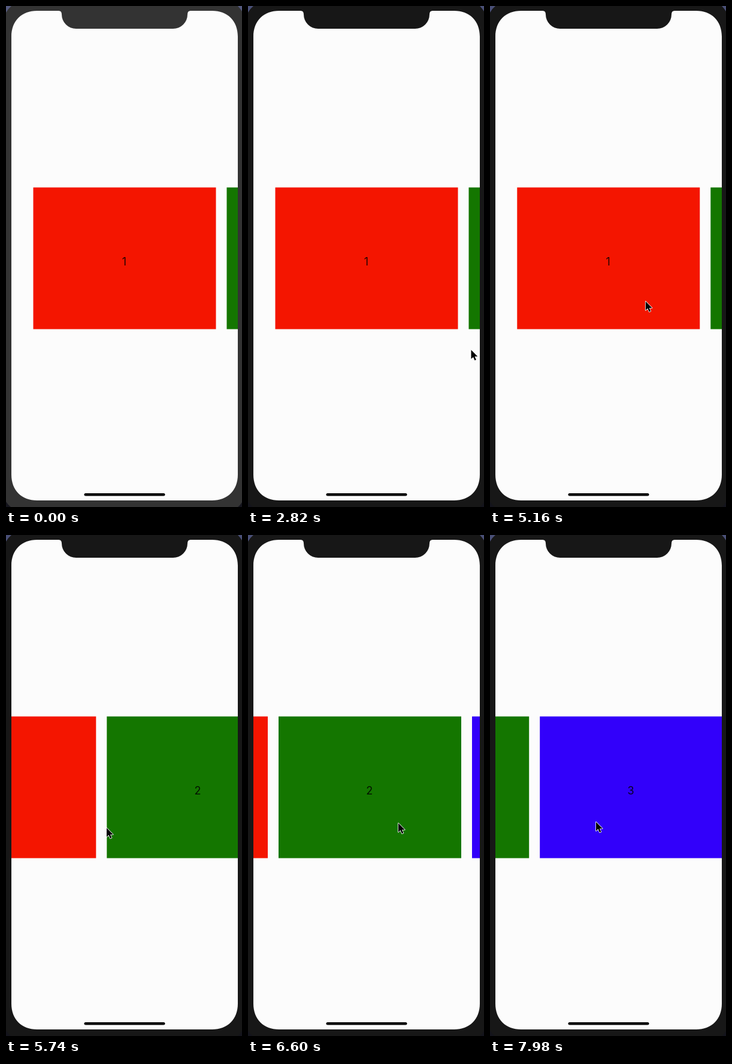
An HTML page that plays this animation: 394x838 px, repeating every 8 s.

```html
<!DOCTYPE html>
<html lang="en">
<head>
<meta charset="utf-8">
<title>Card carousel</title>
<style>
  html, body { margin: 0; width: 100%; height: 100%; overflow: hidden; background: #333; }
  svg { display: block; width: 100vw; height: 100vh; }
  text { font: 18px Inter, Roboto, sans-serif; text-anchor: middle; fill: #000; fill-opacity: .85; }
</style>
</head>
<body>
<svg viewBox="0 0 394 838">
  <defs>
    <path id="screen" d="M9 51C9 25 26 8 52 8H88Q93 8 93 14A24 24 0 0 0 117 38H279
      A24 24 0 0 0 303 14Q303 8 308 8H344C370 8 387 25 387 51V784
      C387 810 370 827 344 827H52C26 827 9 810 9 784Z"/>
    <clipPath id="clip"><use href="#screen"/></clipPath>
  </defs>
  <rect id="bezel" width="394" height="838"/>
  <path id="corners" d="M0 0H9Q4 4 0 11ZM394 0H387Q391 4 394 9Z"/>
  <path d="M0 838V829Q3 834 8 838ZM394 838V830Q391 835 387 838Z" fill="#14141c"/>
  <use href="#screen" fill="#fcfcfc"/>
  <g clip-path="url(#clip)">
    <g id="cards"></g>
  </g>
  <rect x="130.5" y="815" width="135" height="4.6" rx="2.3"/>
  <path id="cursor" d="M0 0V15L3.5 11.8L6 17.5L8.4 16.5L6 11H10.8Z"
    stroke="#fff" stroke-width="1.6" stroke-linejoin="round" paint-order="stroke"/>
</svg>
<script>
  const LOOP = 8000, PITCH = 323, DECAY = 277, ACTIVE_AT = 2800;
  const get = id => document.getElementById(id);
  const [bezel, corners, cards, cursor] = ['bezel', 'corners', 'cards', 'cursor'].map(get);

  cards.innerHTML = ['#f41500', '#147600', '#3200fa'].map((color, i) => `
    <g transform="translate(${45.5 + i * PITCH} 303.5)">
      <rect width="305" height="237" fill="${color}"/>
      <text x="151.8" y="130">${i + 1}</text>
    </g>`).join('');

  // Pointer stops: time, x, y
  const stops = [
    [2600, 394, 585], [3240, 316, 550], [3620, 310, 549], [4080, 268, 553],
    [4250, 263, 553], [4920, 258, 495], [5150, 260, 494], [5540, 168, 490],
    [5800, 168, 490], [6600, 251, 482], [6850, 268, 481], [7420, 177, 480], [LOOP, 177, 480]
  ];
  const ease = p => p * p * (3 - 2 * p);

  function pointer(t) {
    const i = stops.findIndex(stop => stop[0] > t);
    if (i < 1) return [394, 585];
    const [t0, x0, y0] = stops[i - 1], [t1, x1, y1] = stops[i];
    const p = ease((t - t0) / (t1 - t0));
    return [x0 + (x1 - x0) * p, y0 + (y1 - y0) * p];
  }

  // Cards follow the pointer while dragged, then decay towards the next page.
  const settle = (page, from, elapsed) => {
    const end = -page * PITCH;
    return end + (from - end) * Math.exp(-elapsed / DECAY);
  };

  function scroll(t, x) {
    if (t < 5150) return 0;
    if (t < 5566) return x - 260;
    if (t < 6850) return settle(1, -92, t - 5566);
    const caught = settle(1, -92, 6850 - 5566);
    if (t < 7475) return caught + x - 268;
    return settle(2, caught - 91, t - 7475);
  }

  function draw(now) {
    const t = now % LOOP, active = t >= ACTIVE_AT;
    const [x, y] = pointer(t);
    bezel.setAttribute('fill', active ? '#171717' : '#333');
    corners.setAttribute('fill', active ? '#4a5078' : '#555a80');
    cards.setAttribute('transform', `translate(${scroll(t, x)} 0)`);
    cursor.setAttribute('transform', `translate(${x} ${y})`);
    cursor.setAttribute('visibility', t < stops[0][0] ? 'hidden' : 'visible');
  }

  const start = performance.now();
  function tick() {
    draw(performance.now() - start);
    requestAnimationFrame(tick);
  }
  tick();
</script>
</body>
</html>
```
